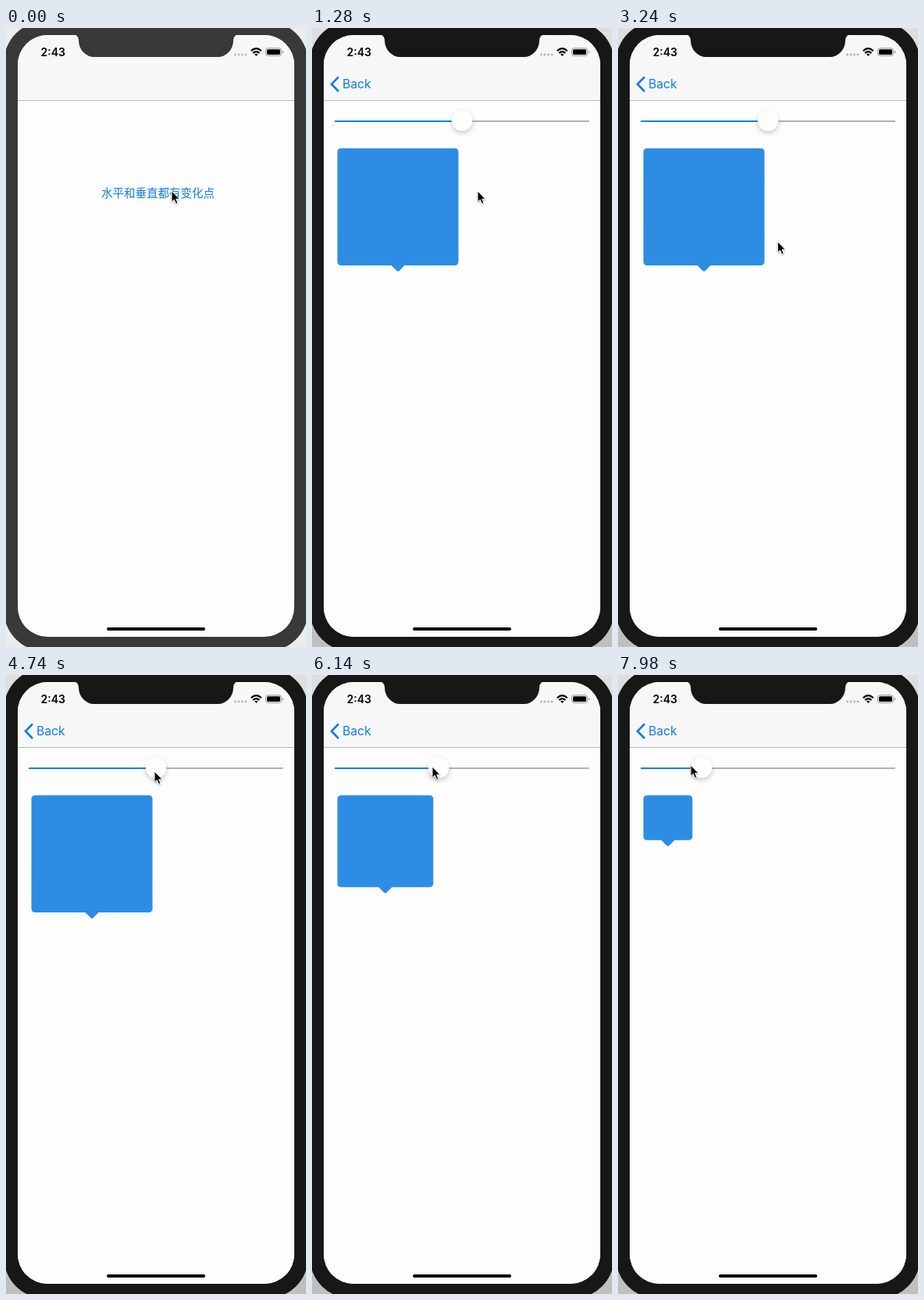
Animation, 384 px wide and 790 px high, one loop 8 s. Source, as an HTML page:

```html
<!DOCTYPE html>
<html lang="zh">
<head>
<meta charset="utf-8">
<title>Slider bubble</title>
<style>
  html, body { margin: 0; width: 100%; height: 100%; overflow: hidden; }
  svg { display: block; width: 384px; height: 790px; }
  .latin { font-family: Inter, sans-serif; }
  .cjk { font-family: "Noto Sans CJK SC", "Noto Sans CJK", sans-serif; }
  #thumb { filter: drop-shadow(0 3px 3px rgba(0, 0, 0, .2)); }
  #cursor { filter: drop-shadow(0 1px 1px rgba(0, 0, 0, .3)); }
</style>
</head>
<body>
<svg viewBox="0 0 384 790">
  <defs><clipPath id="screen"><rect x="15" y="9" width="354" height="768" rx="38"/></clipPath></defs>

  <rect id="deskTop" width="384" height="395"/>
  <rect id="deskBottom" y="395" width="384" height="395"/>
  <rect class="bezel" x="-3" y="-9" width="390" height="805" rx="54"/>

  <g clip-path="url(#screen)">
    <rect x="15" y="9" width="354" height="768" fill="#fdfdfd"/>
    <g id="menu">
      <text class="cjk" x="122" y="216" font-size="14.5" fill="#137de0">水平和垂直都有变化点</text>
    </g>
    <rect id="dim" x="15" y="93" width="354" height="684"/>
    <g id="detail">
      <rect x="15" y="93" width="354" height="684" fill="#fdfdfd"/>
      <rect x="29" y="118" width="326" height="2" rx="1" fill="#b2b2b2"/>
      <rect id="fill" x="29" y="118" width="163" height="2" rx="1" fill="#1680ee"/>
      <circle id="thumb" cy="118" r="13.3" fill="#fefefe"/>
      <path id="bubble" fill="#2d8de4"/>
    </g>
    <rect x="15" y="9" width="354" height="83.5" fill="#f7f7f7"/>
    <rect x="15" y="92" width="354" height="1" fill="#b9b9bd"/>
    <g id="back">
      <path d="M34 62.5L25 71.7L34 81" fill="none" stroke="#117be6" stroke-width="2.6"/>
      <text class="latin" x="39" y="77" font-size="15.7" fill="#117be6">Back</text>
    </g>
  </g>

  <path class="bezel" d="M86 8A7 8 0 0 1 93 16A20 21 0 0 0 113 37H271A20 21 0 0 0 291 16A7 8 0 0 1 298 8Z"/>

  <text class="latin" x="44.5" y="36" font-size="14" font-weight="600">2:43</text>
  <path d="M293.5 34h.01M298 34h.01M302.5 34h.01M307 34h.01" stroke="#b4b4b4" stroke-width="2.8" stroke-linecap="round"/>
  <g fill="none" stroke="#000" stroke-width="2.2">
    <path d="M313.8 29.2Q320.3 23.2 326.8 29.2"/>
    <path d="M316.2 32Q320.3 28.2 324.4 32"/>
  </g>
  <path d="M318 33.6Q320.3 31.8 322.6 33.6L320.3 36Z"/>
  <rect x="332.5" y="25.8" width="20" height="9.6" rx="2.8" fill="none" stroke="#909090"/>
  <rect x="334" y="27.3" width="17" height="6.6" rx="1.5"/>
  <path d="M354 29v3.4q1.3-.5 1.3-1.7t-1.3-1.7" fill="#909090"/>
  <rect x="129" y="765" width="126" height="4" rx="2"/>

  <path id="cursor" d="M0 0V14.2L3.2 11.2L5.6 16.4L8 15.4L5.7 10.3H10Z" stroke="#fff" stroke-width="1"/>
</svg>
<script>
const LOOP = 8000, WIDTH = 354;
const FOCUS_START = 20, FOCUS_END = 540;
const PUSH_START = 990, PUSH_END = 1280;
const $ = id => document.getElementById(id);
const bezels = document.querySelectorAll('.bezel');
const set = (id, attrs) => {
  for (const name in attrs) $(id).setAttribute(name, attrs[name]);
};

// Keys are [time, value, ...]
const thumbKeys = [[5380, 192], [6140, 162.3], [6980, 128], [7580, 117], [7980, 107]];
const cursorKeys = [
  [1380, 212, 208], [1800, 230, 243], [2360, 262, 289], [2600, 261, 293],
  [3000, 226, 284], [3400, 190, 265], [3800, 188, 185], [4180, 190, 123],
  [5380, 190, 123], [6140, 154, 117], [6980, 118, 116], [7980, 93, 115]
];

function sample(keys, t, column = 1) {
  const next = keys.findIndex(key => key[0] > t);
  if (next === 0) return keys[0][column];
  if (next < 0) return keys[keys.length - 1][column];
  const a = keys[next - 1], b = keys[next];
  return a[column] + (b[column] - a[column]) * (t - a[0]) / (b[0] - a[0]);
}

// Critically damped spring
function pushProgress(t) {
  if (t < PUSH_START) return 0;
  if (t >= PUSH_END) return 1;
  const x = (t - PUSH_START) * .027;
  return 1 - (1 + x) * Math.exp(-x);
}

function bubblePath(width) {
  const left = 32.5, top = 153.5, r = 5, height = width - 5.5;
  const tip = left + width / 2;
  return `M${left + r} ${top}h${width - 2 * r}q${r} 0 ${r} ${r}v${height - 2 * r}q0 ${r} ${-r} ${r}` +
    `H${tip + 8.5}l-7 7q-1.5 1.2-3 0l-7-7H${left + r}q${-r} 0 ${-r} ${-r}v${2 * r - height}q0 ${-r} ${r} ${-r}Z`;
}

function draw(t) {
  // The simulator window gains focus: darker frame, stronger shadow
  const focus = Math.min(1, Math.max(0, (t - FOCUS_START) / (FOCUS_END - FOCUS_START)));
  const gray = (from, to) => {
    const level = Math.round(from + (to - from) * focus);
    return `rgb(${level},${level},${level})`;
  };
  bezels.forEach(el => el.setAttribute('fill', gray(57, 23)));
  set('deskTop', { fill: gray(236, 222) });
  set('deskBottom', { fill: gray(236, 191) });

  const push = pushProgress(t);
  set('menu', { transform: `translate(${-push * WIDTH * .3})` });
  set('dim', { opacity: push * .1 });
  set('detail', { transform: `translate(${(1 - push) * WIDTH})`, visibility: push ? 'visible' : 'hidden' });
  set('back', { opacity: push });

  const thumb = sample(thumbKeys, t);
  set('thumb', { cx: thumb });
  set('fill', { width: thumb - 29 });
  set('bubble', { d: bubblePath(155 - (192 - thumb) * 1.085) });
  set('cursor', { transform: `translate(${sample(cursorKeys, t)} ${sample(cursorKeys, t, 2)})` });
}

function tick() {
  draw(performance.now() % LOOP);
  requestAnimationFrame(tick);
}
tick();
</script>
</body>
</html>
```
